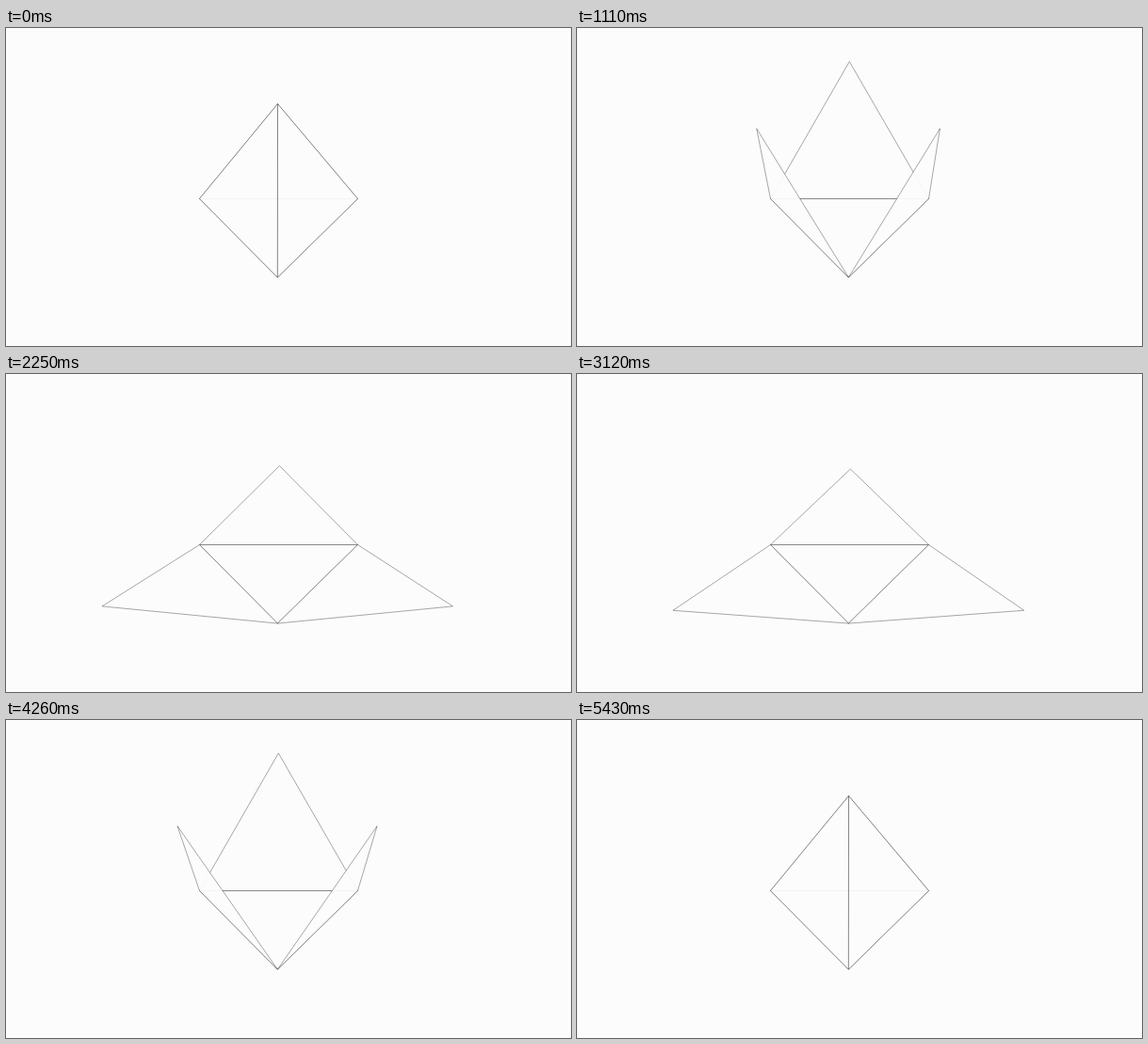
Recreate the animation shown at these times as an HTML page with a canvas. Size 600 by 338 pixels, loop 5460 ms.

```html
<!DOCTYPE html>
<html lang="en">
<head>
<meta charset="utf-8">
<title>Unfolding tetrahedron</title>
<style>
  html, body { margin: 0; width: 100%; height: 100%; overflow: hidden; background: #fcfcfc; }
  canvas { display: block; width: 600px; height: 338px; }
</style>
</head>
<body>
<canvas id="stage" width="600" height="338"></canvas>
<script>
const ctx = document.getElementById('stage').getContext('2d');

const LOOP = 5460, STEP = 30;
const SIDE = 168, HEIGHT = SIDE * Math.sqrt(3) / 2;
const CLOSED = Math.PI - Math.acos(1 / 3);
const TILT = 30.7 * Math.PI / 180;
const DEPTH = 1294;
const HINGE = { x: 289.5, y: 181.5 };
const VANISH = { x: 300, y: 169 };

// x: right, f: towards the viewer along the floor, u: up
function project([x, f, u]) {
  const y = f * Math.sin(TILT) - u * Math.cos(TILT);
  const z = f * Math.cos(TILT) + u * Math.sin(TILT);
  const k = DEPTH / (DEPTH - z);
  return [
    VANISH.x + (HINGE.x + x - VANISH.x) * k,
    VANISH.y + (HINGE.y + y - VANISH.y) * k
  ];
}

function face(points, fill) {
  ctx.beginPath();
  points.map(project).forEach(p => ctx.lineTo(p[0], p[1]));
  ctx.closePath();
  ctx.fillStyle = fill;
  ctx.fill();
  ctx.stroke();
}

const A = [-SIDE / 2, 0, 0], B = [SIDE / 2, 0, 0], C = [0, HEIGHT, 0];

function draw(time) {
  const t = Math.floor((time % LOOP) / STEP) * STEP + STEP / 2;
  const angle = CLOSED * (1 + Math.cos(2 * Math.PI * t / LOOP)) / 2;
  const cos = Math.cos(angle), up = HEIGHT * Math.sin(angle);
  const out = SIDE / 4 + SIDE * 0.75 * cos;
  const front = HEIGHT / 2 * (1 + cos);

  ctx.fillStyle = '#fcfcfc';
  ctx.fillRect(0, 0, 600, 338);
  ctx.lineWidth = 1;
  ctx.lineJoin = 'round';
  ctx.strokeStyle = 'rgba(0,0,0,.34)';

  const veil = 'rgba(252,252,252,.93)';
  face([A, B, C], veil);
  face([A, B, [0, -HEIGHT * cos, up]], veil);
  face([A, C, [-out, front, up]], veil);
  face([B, C, [out, front, up]], veil);
}

const start = performance.now();
function tick() {
  draw(performance.now() - start);
  requestAnimationFrame(tick);
}
tick();
</script>
</body>
</html>
```
